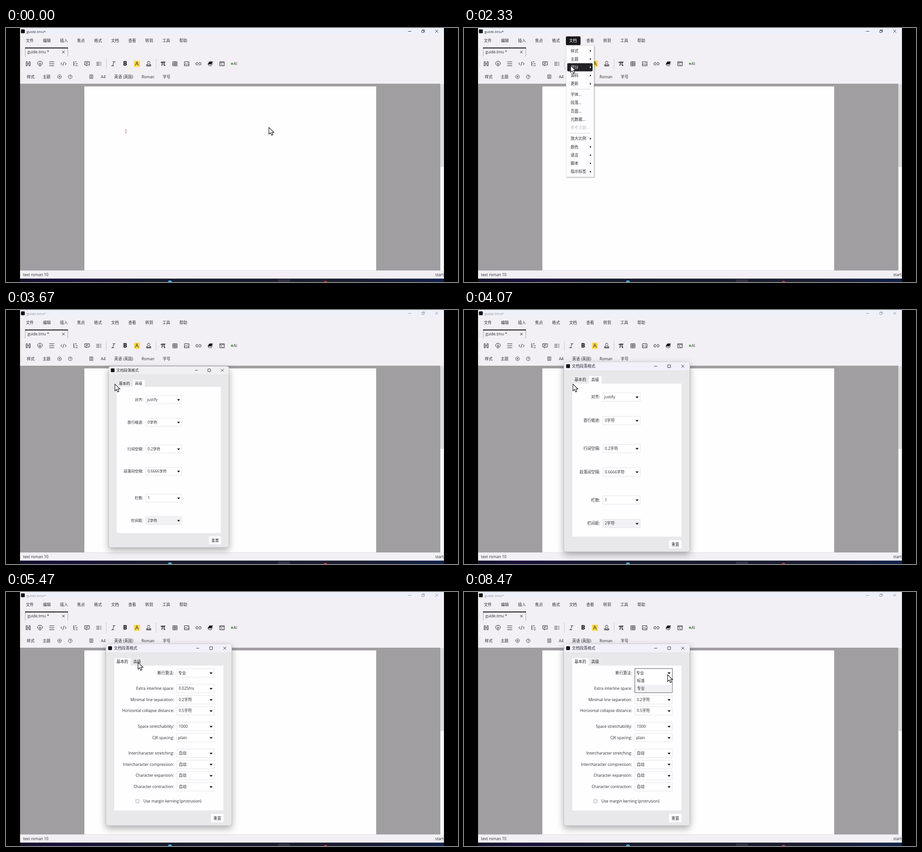
An HTML page for the animation above (8.54 s loop, 998 by 561 pixels).

```html
<!DOCTYPE html>
<html lang="zh-CN">
<head>
<meta charset="utf-8">
<title>guide.tmu</title>
<style>
html, body { margin: 0; width: 100%; height: 100%; overflow: hidden; background: #000; }
svg { display: block; width: 998px; height: 561px; }
text { font: 8.6px "Open Sans", "Noto Sans CJK SC", "Noto Sans CJK", sans-serif; fill: #2c2b2f; white-space: pre; }
.line { fill: none; stroke: #222125; stroke-width: 1; stroke-linejoin: round; }
.window { filter: drop-shadow(0 6px 8px rgba(0,0,0,.32)); }
.menu { filter: drop-shadow(1px 1px 1px rgba(0,0,0,.35)); }
</style>
</head>
<body>
<svg id="stage" viewBox="0 0 998 561"></svg>
<script>
const LOOP = 8540, FPS = 15;
const stage = document.getElementById('stage');

const rect = (x, y, w, h, fill, more = '') =>
  `<rect x="${x}" y="${y}" width="${w}" height="${h}" fill="${fill}" ${more}/>`;
const text = (x, cy, s, more = '') => `<text x="${x}" y="${cy + 3.1}" ${more}>${s}</text>`;
const line = (d, more = '') => `<path class="line" d="${d}" ${more}/>`;
const icon = (x, y, d, more = '') => line(d, `transform="translate(${x} ${y})" ${more}`);
const group = (id, body, more = '') => `<g id="${id}" ${more}>${body}</g>`;
const solid = 'style="fill:#19181c"';
const END = 'text-anchor="end"', MID = 'text-anchor="middle"';

// Main window
const menuNames = ['文件', '编辑', '插入', '焦点', '格式', '文档', '查看', '转到', '工具', '帮助'];
const buttons = [49, 75, 101, 127, 153, 179, 205, 237, 263, 289, 315, 347, 373, 399, 425, 451, 477, 503];

function toolbar() {
  const y = 79;
  return [
    icon(49, y, 'M-4.5-4.5h2.7v9h-2.7zM1.8-4.5h2.7v9H1.8zM-1.8 0h3.6'),
    icon(75, y, 'M-1.5 4.5C-4 2.5-5.2 1-5.2-1A5.2 4.6 0 0 1 5.2-1C5.2 1 4 2.5 1.5 4.5L0 5.3ZM0-2.6l1.8 2.4L0 3.2-1.8-.2Z'),
    icon(101, y, 'M-5.5-4.3h11M-5.5 0h11M-5.5 4.3h11', 'stroke-width="1.2"'),
    icon(127, y, 'M-3.3-3L-6 0l2.7 3M3.3-3L6 0 3.3 3M1.3-4.3L-1.3 4.3'),
    icon(153, y, 'M-4.5-4.3h2M-1-4.3h4M-3.5-4v8h2M-3.5 0h2M.5 0h4.7M.5 4.2h4.7'),
    icon(179, y, 'M-5.2-4.6H5.2v7.4H.8L-1.5 5V2.8h-3.7zM-2.8-2h5.6M-2.8.3h3.6'),
    icon(205, y, 'M-5.5-3.2h7M-5.5 0h7M-5.5 3.2h7M3.2-3.2h2.3M3.2 0h2.3M3.2 3.2h2.3'),
    icon(237, y, 'M-1.5-4.5h6M-4.5 4.5h6M1.6-4.5l-3.2 9', 'stroke-width="1.2"'),
    text(263, y + .7, 'B', MID + ' style="font-size:13.5px;font-weight:800"'),
    rect(282.5, 72.3, 13.2, 13.4, '#fbd84c'),
    text(289, y + .9, 'A', MID + ' style="font-size:12.5px"'),
    icon(315, y, 'M-1.5 1.5v-2A2.8 2.8 0 1 1 1.5-.5v2h3.2v2H-4.7v-2zM-5.5 5h11'),
    icon(347, y, 'M-5-2.2C-4.4-3.6-3.6-3.7-2.5-3.7H5M-1.7-3.5C-1.7 0-2 2.5-3.2 4.2M2-3.5V2.6C2 4 3.5 4.3 4.4 2.8', 'style="stroke-width:1.7"'),
    icon(373, y, 'M-4.6-4.6h9.2v9.2h-9.2zM-4.6-1.5h9.2M-4.6 1.5h9.2M0-4.6v9.2'),
    icon(399, y, 'M-5-4.5H5v9H-5zM-5 3l3.2-3.5 2.5 2.6L2.5.3 5 3M1.6-2.2h1.4'),
    icon(425, y, 'M-1-2.7h-2.2a2.7 2.7 0 0 0 0 5.4H-1M1-2.7h2.2a2.7 2.7 0 0 1 0 5.4H1M-2.8 0h5.6'),
    icon(451, y, 'M-2-4.5H5.3L2.2 1h-7.4z', solid), icon(451, y, 'M-5.2 1.2l2.4 3.3h5l3-5.5'),
    icon(477, y, 'M-5-4.5H5v9H-5zM-5-2.3H5M-2.5-.5L-.8 1l-1.7 1.5M.5 2.6h2.2'),
    '<circle cx="499" cy="79" r="2.4" fill="#5d9e50"/>',
    text(502.3, y, 'AI')
  ].join('');
}

function optionsBar() {
  const y = 108;
  return text(46, y, '样式') + text(81, y, '主题') +
    icon(118.2, 107.7, 'M-4.2 0a4.2 4.2 0 1 0 8.4 0a4.2 4.2 0 1 0-8.4 0M-2.2 0h4.4M0-2.2v4.4', 'style="stroke-width:.8"') +
    icon(141.8, 107.7, 'M-4.2 0a4.2 4.2 0 1 0 8.4 0a4.2 4.2 0 1 0-8.4 0M-1.3-1A1.3 1.3 0 1 1 0 .4V1M0 2v.8', 'style="stroke-width:.8"') +
    icon(188.3, 107.5, 'M-3.5-4h7v8h-7zM-2-2h4M-2 0h4M-2 2h4', 'style="stroke-width:.8"') +
    text(209.5, y, 'A4') + text(239, y, '英语 (英国)') + text(299.3, y, 'Roman') + text(346, y, '字号');
}

function mainWindow() {
  const edge = '#dddce0';
  return rect(0, 0, 998, 561, '#000') + rect(31, 0, 936, 561, '#f2f0f4') + rect(31, 0, 936, 14, '#eff1fa') +
    rect(33, 3, 8.5, 8.5, '#111', 'rx="1.5"') +
    group('caption', text(45.3, 7.6, 'guide.tmu*', 'style="font-size:8px;fill:inherit"') +
      '<path d="M887.5 7.5h7.5M918 5.5h4.5v4.5H918zM919.5 5.500V4h4.500v4.500H922.500M947.700 3.800l6.600 6.600m0-6.600l-6.600 6.600" fill="none" stroke="currentColor" stroke-width=".9"/>') +
    rect(225, 18.5, 32.3, 19.3, '#171619', 'id="docOn" rx="2"') +
    menuNames.map((s, i) => text(44 + i * 37.65, 28.3, s, i === 5 ? 'id="docName"' : '')).join('') +
    line('M42.500 63V44M136.500 63V44', 'style="stroke:#a9a8ac"') + rect(42, 43, 95, 2.2, '#2c2430') +
    text(47.4, 52.8, 'guide.tmu *') + icon(126.700, 53.200, 'M-2.700-2.700l5.400 5.400M2.700-2.700l-5.400 5.400') +
    line('M34.500 43v20M34.500 68v22M34.500 98v20', `style="stroke:${edge}"`) +
    line('M221.500 68v22M331.500 68v22', 'style="stroke:#c9c8cc"') +
    rect(0, 68.3, 21, 21.7, '#dddce0', 'id="hover" rx="3"') + toolbar() + optionsBar() +
    rect(31, 123, 928, 412.5, '#a09ea1') + rect(173, 129, 644.3, 406.5, '#fffeff') +
    rect(959, 123, 8, 412.5, '#f8f7f9') + rect(959.3, 123.500, 7.400, 183.500, '#dbdadd', 'rx="2"') +
    line('M263.300 224.500h3M264.800 224.500v7M263.300 231.500h3', 'style="stroke:#b0604e;stroke-width:.9"') +
    text(37.7, 545, 'text roman 10') + text(966.3, 545, 'start', END) +
    '<defs><linearGradient id="night"><stop stop-color="#101028"/><stop offset=".1" stop-color="#180f3c"/><stop offset=".3" stop-color="#17192c"/><stop offset=".8" stop-color="#1b1c30"/><stop offset="1" stop-color="#10204a"/></linearGradient></defs>' +
    rect(31, 553.5, 936, 7.5, 'url(#night)') + rect(600.500, 555.500, 26.500, 9, '#303042', 'rx="2"') +
    '<circle cx="362" cy="562.500" r="5" fill="#45b4e4"/><circle cx="705.500" cy="563" r="4.500" fill="#d52c2c"/>' +
    text(936, 563.5, '16:43', 'style="font-size:7px;fill:#8c95ac"') + rect(967, 0, 31, 561, '#000');
}

// Drop-down menu: + opens a submenu, ! is disabled
const entries = [
  [50.5, '样式+'], [68.7, '主题+'], [86.7, '部分+'], [105, '源码+'], [123.2, '更新+'],
  [147, '字体...'], [165.2, '段落...'], [183.4, '页面...'], [201.7, '元数据...'], [220, '参考文献...!'],
  [244.3, '放大比例+'], [262.6, '颜色+'], [280.9, '语言+'], [299, '脚本+'], [317.3, '指示标签+']
];
function docMenu() {
  const rows = entries.map(([y, s], i) => {
    const arrow = s.includes('+') ? `<path d="M278 ${y - 2.6}l2.800 2.600-2.800 2.600z"/>` : '';
    const off = s.includes('!') ? 'style="fill:#c2c1c5"' : '';
    return `<g class="entry">${rect(228, y - 9, 56, 18, '#232226', 'rx="2" class="bar"')}${text(235.500, y, s.replace(/[+!]/, ''), off)}${arrow}</g>`;
  }).join('');
  return group('menu', rect(225.500, 39, 61.500, 290, '#fdfcff', 'class="menu" stroke="#d4d3d7" stroke-width=".6"') +
    line('M234 135h45M234 232.500h45', 'style="stroke:#d8d7da"') + rows);
}

// Paragraph dialog
const combo = (x, y, s, fill = '#fff') =>
  rect(x + .5, y - 9, 82.500, 18.500, fill, 'stroke="#e0dfe2" stroke-width=".9"') +
  text(x + (/^[a-z\u4e13]/.test(s) ? 3.5 : 4.7), y, s) +
  `<path d="M${x + 72.700} ${y - 1}h6.800l-3.400 4z" fill="#19181c"/>`;
const field = (x, y, label, value, fill) => text(x - 5.700, y, label + ':', END) + combo(x, y, value, fill);

const shell = (h, tab) =>
  rect(220.500, 115, 278, h, '#e8e7ea', 'class="window" rx="5" stroke="#b5b4b8" stroke-width=".7"') +
  `<path class="strip" d="M221 133v-13q0-5 5-5h267q5 0 5 5v13z"/>` +
  rect(225.500, 119.800, 8.500, 8.500, '#111', 'rx="1.500"') + text(238.300, 124, '文档段落格式') +
  line('M420 124.200h6.600M449.800 121h6.200v6.200h-6.200zM480 121l6.300 6.300m0-6.300l-6.300 6.300', 'style="stroke-width:.9"') +
  rect(239, 146, 36, 17, tab ? '#fdfdff' : '#ebeaed') + rect(276, 146, 28, 17, tab ? '#ebeaed' : '#fdfdff') +
  text(244, 154.300, '基本的') + text(281, 154.300, '高级') +
  rect(239, 162.500, 241, h - 81, '#fefdff') +
  rect(452.500, h + 89, 28, 18.500, '#fdfdff', 'rx="1"') + text(466.500, h + 98.500, '重置', MID);

const basic = () => shell(419, 0) + [
  [192, '对齐', 'justify'], [244, '首行缩进', '0字符'], [305.800, '行间空隔', '0.2字符'],
  [357.500, '段落间空隔', '0.6666字符'], [419.500, '栏数', '1'], [471.300, '栏间距', '2字符', '#f2f1f4']
].map(([y, ...f]) => field(306, y, ...f)).join('');

const advanced = () => shell(401, 1) + [
  [178.500, '断行算法', '专业'], [213, 'Extra interline space', '0.025fns'],
  [237.700, 'Minimal line separation', '0.2字符'], [262.300, 'Horizontal collapse distance', '0.5字符'],
  [296.700, 'Space stretchability', '1000'], [321.400, 'CJK spacing', 'plain'],
  [356, 'Intercharacter stretching', '自动'], [380.600, 'Intercharacter compression', '自动'],
  [405.200, 'Character expansion', '自动'], [430, 'Character contraction', '自动']
].map(([y, ...f]) => field(376.700, y, ...f)).join('') +
  rect(286.200, 458, 8, 8, '#efeef1', 'rx="1.500" stroke="#a3a2a6" stroke-width=".8"') +
  text(303.500, 462.200, 'Use margin kerning (protrusion)') +
  group('list', rect(377.200, 169, 82.800, 53.300, '#fff', 'stroke="#3b3a3e" stroke-width=".9"') +
    rect(379, 205, 80.500, 16.500, '#f1f0f3') + text(380.200, 178.500, '专业') + text(382, 195.800, '标准') +
    text(382, 213.200, '专业') + '<path d="M449.400 177.500h6.800l-3.400 4z" fill="#19181c"/>');

stage.innerHTML = mainWindow() + docMenu() +
  group('dialog', group('basic', basic()) + group('advanced', advanced())) +
  group('pointer', '<path d="M.5 .7V15.600L4 12.500L6.500 18L9.300 16.800L6.900 11.500H11.600Z" fill="#fff" stroke="#0b0b0d" stroke-width="1.100"/>');

const el = {};
stage.querySelectorAll('[id]').forEach(n => el[n.id] = n);
const rows = [...stage.querySelectorAll('.entry')];
const strips = stage.querySelectorAll('.strip');

// Pointer path: time, x, y
const path = [
  [0, 580, 219], [866, 580, 219], [1266, 282, 75], [1660, 236, 29], [2060, 236, 29], [2333, 235, 82],
  [2800, 240, 163], [4930, 240, 163], [5300, 291, 155], [5466, 291, 155], [5733, 320, 161],
  [6466, 449, 182], [LOOP, 449, 182]
];
// Monotone cubic through the points
function along(t, axis) {
  const slope = i => path[i + 1] && path[i] ? (path[i + 1][axis] - path[i][axis]) / (path[i + 1][0] - path[i][0]) : 0;
  const tangent = i => {
    const a = slope(i - 1), b = slope(i);
    return a * b > 0 ? 2 * a * b / (a + b) : 0;
  };
  let i = 0;
  while (i < path.length - 2 && t >= path[i + 1][0]) i++;
  const span = path[i + 1][0] - path[i][0], p = Math.min(1, (t - path[i][0]) / span), q = 1 - p;
  return path[i][axis] * (1 + 2 * p) * q * q + path[i + 1][axis] * p * p * (3 - 2 * p) +
    span * p * q * (tangent(i) * q - tangent(i + 1) * p);
}

const show = (n, on) => n.style.display = on ? '' : 'none';

function render(now) {
  const step = Math.floor((now % LOOP + 4) * FPS / 1000);
  const t = step * 1000 / FPS;
  const x = along(t, 1), y = along(t, 2);
  el.pointer.setAttribute('transform', `translate(${x} ${y})`);

  const menuOpen = step >= 26 && step < 51;
  const dialogOpen = step >= 54;
  const onDoc = x > 225 && x < 257 && y > 18 && y < 38;
  show(el.docOn, onDoc || menuOpen);
  el.docName.style.fill = onDoc || menuOpen ? '#fff' : '';

  const hit = !menuOpen && !dialogOpen && y > 68 && y < 90 && buttons.find(b => Math.abs(x - b) < 11);
  show(el.hover, hit);
  if (hit) el.hover.setAttribute('x', hit - 10.500);

  show(el.menu, menuOpen);
  el.menu.style.opacity = [.35, .7, .9][step - 26] || 1;
  rows.forEach((row, i) => {
    const on = Math.abs(y - entries[i][0]) < 9.100;
    show(row.firstChild, on);
    row.style.fill = on ? '#fff' : '#19181c';
    if (i !== 9) row.children[1].style.fill = on ? '#fff' : '';
  });

  el.caption.style.fill = el.caption.style.color = dialogOpen ? '#939298' : '#29282d';
  show(el.dialog, dialogOpen);
  const size = [.9, .955, .985, .996][step - 54] || 1;
  el.dialog.setAttribute('transform', `translate(359 324.500) scale(${size}) translate(-359 -324.500)`);
  el.dialog.style.opacity = step === 54 ? .5 : 1;
  strips.forEach(s => s.style.fill = step < 56 ? '#f0f0f2' : '#f2f1fa');
  show(el.basic, step < 81);
  show(el.advanced, step >= 81);
  show(el.list, step >= 100);
}

const start = performance.now();
function tick() {
  render(performance.now() - start);
  requestAnimationFrame(tick);
}
tick();
</script>
</body>
</html>
```
